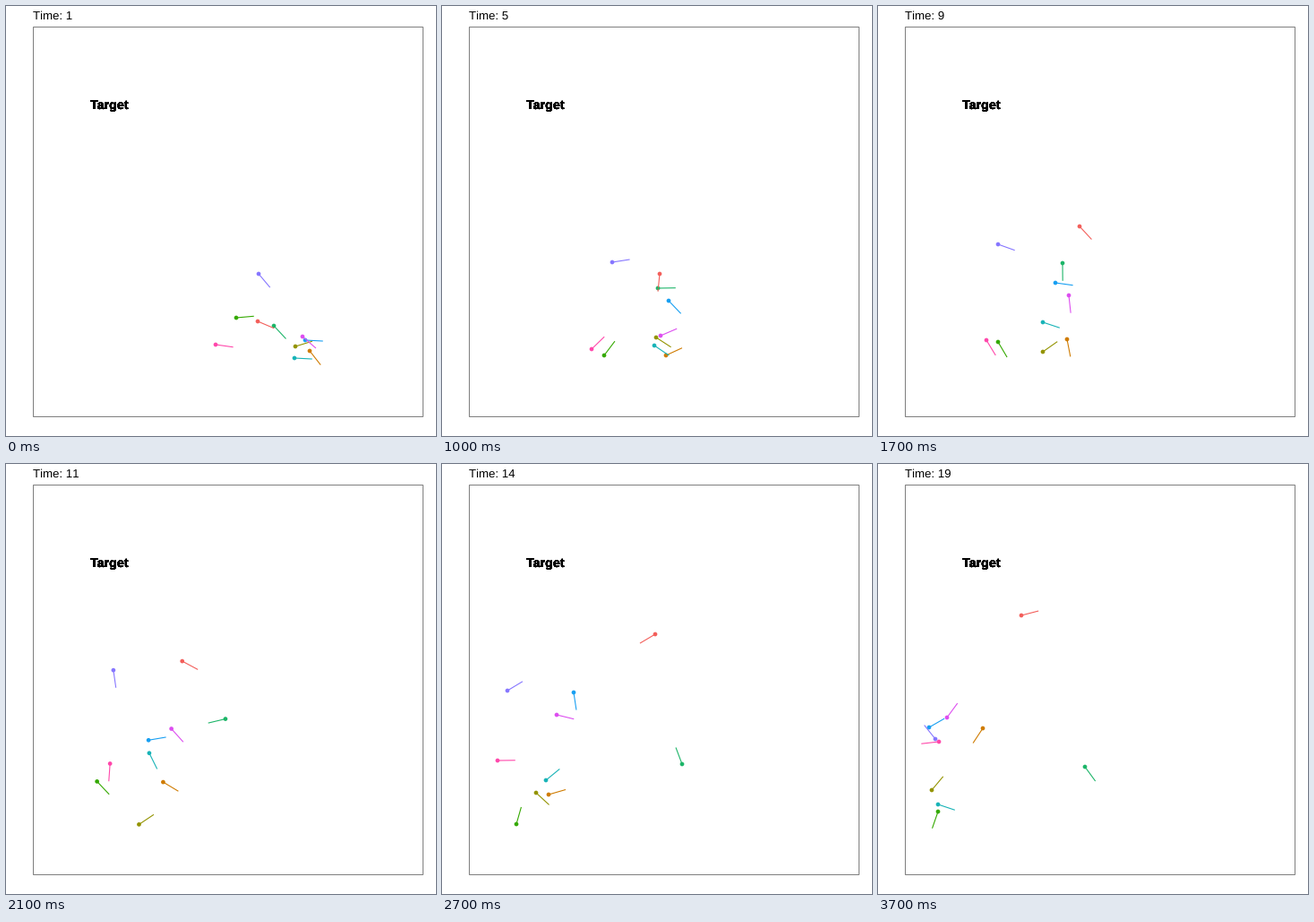
A matplotlib script that plays this animation: 480x480 px, repeating every 3800 ms.

```python
import numpy as np
import matplotlib.pyplot as plt
from matplotlib.animation import FuncAnimation
from matplotlib.collections import LineCollection
from matplotlib.patches import Rectangle

SIZE, DPI = 480, 72
FRAMES, INTERVAL = 38, 100
STEP = 19.8                     # pixels walked per time step
KEYS = (1, 6, 9, 14, 19)        # time steps of the key points below

# colour: heading at the start in degrees, then the key points
WALKERS = {
    "#F35E5A": (203, (281, 352), (243, 299), (225, 246), (238, 190), (160, 169)),
    "#CF7B00": (232, (339, 385), (250, 390), (211, 372), (119, 369), (117, 295)),
    "#939300": (163, (323, 380), (239, 370), (184, 386), (105, 367), (60, 364)),
    "#34A900": (175, (257, 348), (181, 390), (134, 375), (83, 402), (67, 388)),
    "#1CB568": (227, (299, 357), (241, 315), (206, 287), (268, 335), (231, 338)),
    "#17B3B7": (183, (322, 393), (237, 379), (184, 353), (116, 353), (67, 380)),
    "#179FF2": (183, (334, 373), (253, 329), (198, 309), (147, 255), (57, 294)),
    "#8676FF": (230, (282, 299), (190, 286), (134, 266), (73, 253), (64, 307)),
    "#DD4DF0": (221, (331, 369), (244, 368), (213, 323), (128, 280), (77, 283)),
    "#FF47AB": (188, (234, 378), (167, 383), (121, 373), (62, 331), (68, 310)),
}

plt.rcParams["font.family"] = "Liberation Sans"
plt.rcParams["text.hinting"] = "none"
plt.rcParams["text.kerning_factor"] = 6     # no pair kerning


def turn_gap(a, b):
    return abs((a - b + np.pi) % (2 * np.pi) - np.pi)


def unit(angle):
    return np.stack([np.cos(angle), np.sin(angle)], axis=-1)


def weave(a, b, n, heading):
    """n equal steps from a to b, swaying once to each side of the chord."""
    dx, dy = b - a
    chord, aim = np.hypot(dx, dy), np.arctan2(dy, dx)
    sway = np.sin(2 * np.pi * (np.arange(n) + 0.5) / n)
    widths = np.linspace(0, 2.2, 500)
    reach = np.cos(np.outer(widths, sway)).sum(axis=1)
    width = np.interp(chord / STEP, reach[::-1], widths[::-1])
    side = min((1, -1), key=lambda s: turn_gap(aim + s * width * sway[0], heading))
    heads = aim + side * width * sway
    step = chord / np.cos(width * sway).sum()
    return a + step * np.cumsum(unit(heads), axis=0), heads[-1]


def walk(start, *points):
    """Positions at time steps 0 to 19."""
    heading = np.radians(start)
    points = np.array(points, float)
    path = [points[0] - STEP * unit(heading), points[0]]
    for a, b, n in zip(points, points[1:], np.diff(KEYS)):
        steps, heading = weave(a, b, n, heading)
        path.extend(steps)
    return path


colors = list(WALKERS)
paths = np.array([walk(*row) for row in WALKERS.values()])   # walker, step, xy

fig = plt.figure(figsize=(SIZE / DPI, SIZE / DPI), dpi=DPI, facecolor="white")
ax = fig.add_axes([0, 0, 1, 1])
ax.set(xlim=(0, SIZE), ylim=(SIZE, 0))
ax.axis("off")

ax.add_patch(Rectangle((30, 23), 435, 435, fill=False,
                       edgecolor="#7F7F7F", linewidth=1))
clock = ax.text(30, 15, "", fontsize=13.2, color="black")
# Stacked copies give the label its hard, heavy edges
for _ in range(8):
    ax.text(116, 115.2, "Target", fontsize=14.2, weight="bold",
            ha="center", color="black")

dots = ax.scatter(*paths[:, 1].T, s=4.7 ** 2, c=colors, linewidths=0, zorder=3)
tails = LineCollection(paths[:, :2], colors=colors, linewidths=1.1, zorder=4)
ax.add_collection(tails)


def update(frame):
    step = frame // 2 + 1
    clock.set_text(f"Time: {max(1, (frame + 1) // 2)}")
    dots.set_offsets(paths[:, step])
    tails.set_segments(paths[:, step - 1:step + 1])
    return clock, dots, tails


anim = FuncAnimation(fig, update, frames=FRAMES, interval=INTERVAL,
                     repeat=True, repeat_delay=0)
plt.show()
```
